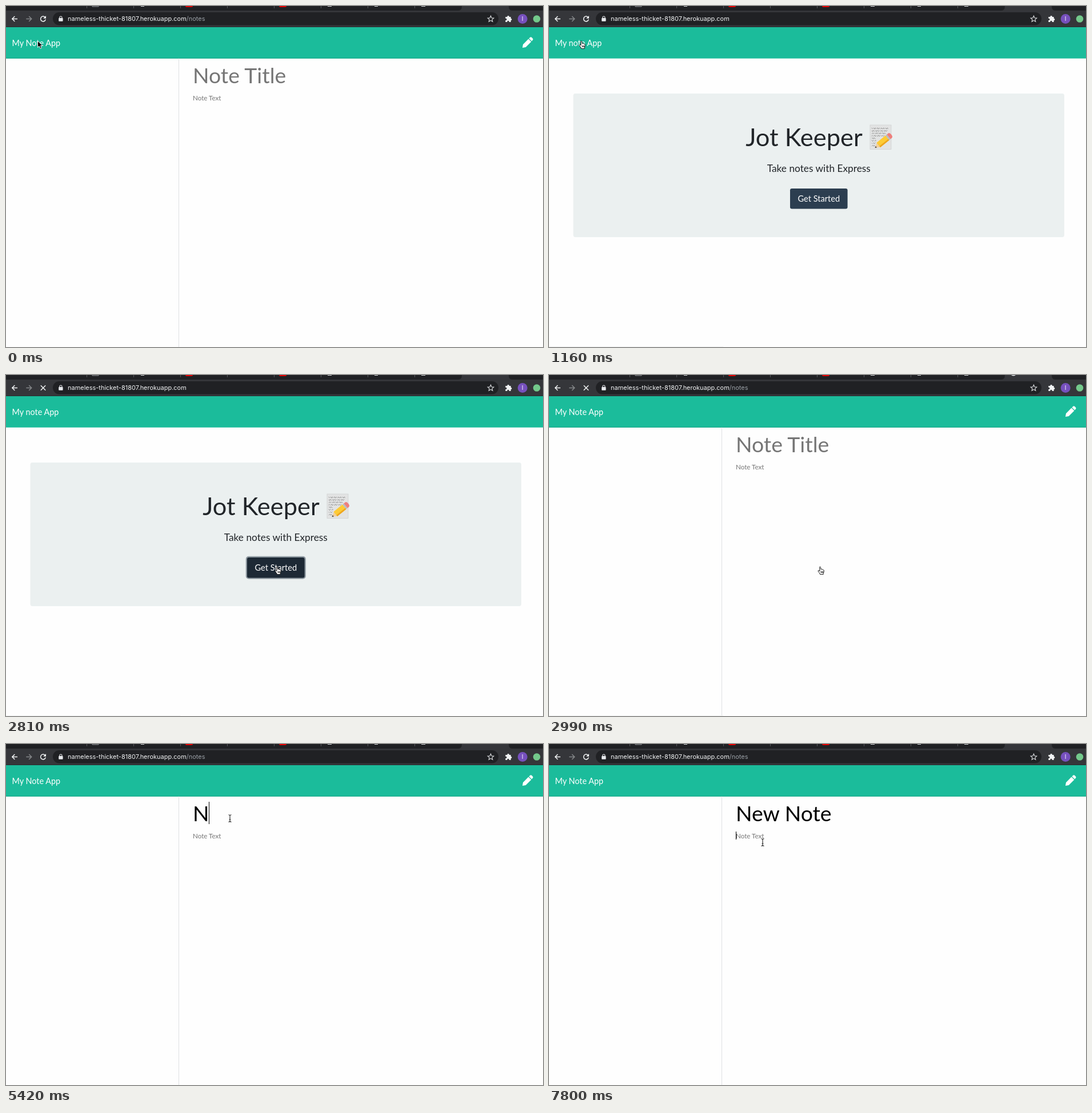
Animation, 940 px wide and 596 px high, one loop 8000 ms. Source, as an HTML page:

```html
<!DOCTYPE html>
<html lang="en">
<head>
<meta charset="utf-8">
<title>My Note App</title>
<style>
html, body { margin: 0; width: 100%; height: 100%; overflow: hidden; background: #fefefe; }
svg { display: block; }
text { font-family: Lato, sans-serif; white-space: pre; }
.ui { font-family: Inter, "Liberation Sans", sans-serif; font-size: 10.97px; }
.line { fill: none; stroke: #f1f3f4; stroke-width: 1.5; }
</style>
</head>
<body>
<svg width="940" height="596" viewBox="0 0 940 596">
  <defs>
    <path id="arrow" d="M0 0V11.5L2.7 9L4.6 13.3L6.7 12.4L4.9 8.3H8.4Z" fill="#000" stroke="#fff" stroke-width=".9"/>
    <path id="hand" d="M-2.5 -5.7C-2.5 -7.2 -.6 -7.2 -.5 -5.8L-.1 -2.4C.5 -3.2 1.8 -3 2 -2C2.8 -2.5 3.7 -2 3.9 -1.2C4.7 -1.4 5.3 -.8 5.3 0C5.3 2.4 4.8 3.6 4.2 4.6V6.4H-1.5C-2 4.6 -3.4 3 -4.8 1C-5.5 -.3 -4 -1 -3.1 0L-2 1ZM.2 1V4M2 1V4M3.7 1V4" fill="#fff" stroke="#000" stroke-width=".9" stroke-linejoin="round"/>
    <path id="beam" d="M-2.5 -6.2Q-.3 -6.2 0 -5Q.3 -6.2 2.5 -6.2M0 -5V5M-2.5 6.2Q-.3 6.2 0 5Q.3 6.2 2.5 6.2M-1.4 2H1.4" fill="none" stroke="#222" stroke-width="1.1"/>
  </defs>

  <rect width="940" height="596" fill="#fefefe"/>

  <!-- browser bar -->
  <rect width="940" height="37" fill="#35363a"/>
  <path d="M0 36.5H940" stroke="#2b2c2f"/>
  <path d="M0 0H798Q798 8 792 8H0ZM880 0H940V8H886Q880 8 880 0Z" fill="#202124"/>
  <path d="M141.5 0V4M223.5 0V4M305.5 0V4M387.5 0V4M469.5 0V4M551.5 0V4M633.5 0V4M715.5 0V4" stroke="#55575b"/>
  <path d="M151 0V1H162V0" fill="none" stroke="#9a9da1"/>
  <path d="M314 0H327V1Q326 2 324 2H317Q314 2 314 0ZM478 0H491V1Q490 2 488 2H481Q478 2 478 0Z" fill="#e80000"/>
  <path d="M236 0H242V1H236ZM645 0H651V1H645ZM563 0H570V1H563ZM727 0H734V1H727Z" fill="#d5d7d9"/>
  <path id="spinner" d="M809 0Q813 3 817 0Z" fill="#e8eaed"/>
  <rect x="82" y="11" width="780" height="22.5" rx="11.2" fill="#202124"/>
  <path class="line" d="M20 22.5H11M15.3 18L10.8 22.5L15.3 27"/>
  <path class="line" d="M35.3 22.5H44.3M40.2 18L44.7 22.5L40.2 27" style="stroke:#85878a"/>
  <g id="reload">
    <path class="line" d="M68.7 20.1A4.4 4.4 0 1 0 69.3 23.4"/>
    <path d="M70 17V21.8H65.2Z" fill="#f1f3f4"/>
  </g>
  <path id="stop" class="line" d="M60.8 18.3L69.2 26.7M69.2 18.3L60.8 26.7"/>
  <rect x="92.2" y="21" width="7.4" height="5.8" rx=".8" fill="#e8eaed"/>
  <path d="M93.9 21.5V20A2 2 0 0 1 97.9 20V21.5" fill="none" stroke="#e8eaed" stroke-width="1.1"/>
  <text class="ui" x="108" y="26.3" fill="#f1f3f4">nameless-thicket-81807.herokuapp.com<tspan id="path" fill="#9aa0a6">/notes</tspan></text>
  <path d="M848.5 17.2L850 20.8L853.8 21.1L850.9 23.6L851.8 27.3L848.5 25.3L845.2 27.3L846.1 23.6L843.2 21.1L847 20.8Z" fill="none" stroke="#dcdee0" stroke-width="1.1"/>
  <path d="M874.3 19H877.5A1.7 1.7 0 1 1 880.8 19H883.7V21.8A1.7 1.7 0 1 1 883.7 25.2V28H880.6A1.7 1.7 0 1 0 877.4 28H874.3V25A1.7 1.7 0 1 0 874.3 21.8Z" fill="#f1f3f4"/>
  <circle cx="904.2" cy="22.5" r="8.5" fill="#7650bd"/>
  <text class="ui" x="904.2" y="26" text-anchor="middle" fill="#fff" style="font-size:10px">I</text>
  <circle cx="929" cy="22.5" r="6.3" fill="#73c98b"/>

  <!-- page header -->
  <rect y="37" width="940" height="54.7" fill="#1bbc9b"/>
  <text id="brand" x="10.6" y="69.8" font-size="14.4" fill="#fff"></text>

  <g id="notes">
    <path d="M0 91.2H940" stroke="#17a589"/>
    <path d="M302.5 91.7V596" stroke="#dfe1e3"/>
    <path d="M904 73L905 67.2L914.6 57.6L919.4 62.4L909.8 72ZM915.5 56.7L917.4 54.8Q918.7 53.6 920 54.8L922 56.8Q923.2 58.2 922 59.5L920.2 61.4Z" fill="#fff"/>
    <text id="title" x="327" y="134.8" font-size="37.4"></text>
    <text x="327" y="164.6" font-size="11.6" fill="#757575">Note Text</text>
    <rect id="caret" width="1" fill="#000"/>
  </g>

  <g id="home">
    <rect x="42.5" y="153" width="859.5" height="251" rx="3.7" fill="#ebf0f0"/>
    <text x="446.5" y="245" font-size="43.4" text-anchor="middle" fill="#212529">Jot Keeper</text>
    <rect x="562" y="208" width="37" height="42.5" fill="#e2e3e3" stroke="#d0d2d2" stroke-width=".8"/>
    <path id="scribble" fill="none" stroke="#777" stroke-width=".7"/>
    <g transform="translate(570.5 248) rotate(-39)">
      <path d="M0 0L9 -5.2V5.2Z" fill="#f0cf9e"/>
      <path d="M0 0L3 -1.7V1.7Z" fill="#444"/>
      <rect x="8" y="-5.2" width="20" height="10.4" fill="#fdcb35"/>
      <rect x="8" y="2.6" width="20" height="2.6" fill="#eda51f"/>
      <rect x="28" y="-5.2" width="3" height="10.4" fill="#b9bcc0"/>
      <path d="M31 -5.2H33.5Q37 -5.2 37 0T33.5 5.2H31Z" fill="#ee7f7c"/>
    </g>
    <text x="472.3" y="290" font-size="17.3" text-anchor="middle" fill="#212529">Take notes with Express</text>
    <rect id="ring" x="419.8" y="316.8" width="105" height="39.6" rx="5" fill="#8c979f"/>
    <rect id="button" x="422" y="319" width="100.6" height="35.5" rx="3.2"/>
    <text x="472.3" y="342" font-size="14.6" text-anchor="middle" fill="#fff">Get Started</text>
  </g>

  <rect id="status" y="595" width="305" height="1" fill="#f2f3f3"/>
  <use id="cursor"/>
</svg>
<script>
const LOOP = 8000;
const $ = id => document.getElementById(id);
const show = (id, on) => $(id).style.display = on ? "" : "none";
const set = (id, attrs) => Object.entries(attrs).forEach(([k, v]) => $(id).setAttribute(k, v));
const during = (t, a, b) => t >= a && t < b;

// time, shape, x, y
const moves = [
  [0, "arrow", 55.5, 61], [290, "hand", 58, 68],
  [1310, "arrow", 190, 170], [1490, "arrow", 418.5, 346],
  [1790, "hand", 448, 349], [1940, "hand", 463, 345], [2090, "hand", 472, 343], [2230, "hand", 476, 342],
  [3140, "arrow", 474, 335], [3300, "arrow", 410, 270], [3460, "arrow", 290, 185], [3620, "arrow", 185, 131],
  [3770, "arrow", 225, 128], [3920, "arrow", 290, 126], [4070, "beam", 350, 128], [4220, "beam", 386, 130],
  [4370, "beam", 392, 130],
  [7210, "beam", 390, 142], [7360, "beam", 384, 162], [7500, "beam", 376, 177], [7650, "beam", 374, 172]
];
const typed = "New Note";
const keys = [5420, 5570, 5710, 5860, 6160, 6310, 6460, 6610];

// handwriting: wavy lines that get shorter beside the pencil
let scribble = "";
for (let row = 0; row < 8; row++) {
  const end = row < 4 ? 595 - row * 2 : 578 - row;
  for (let x = 565; x < end; x += 1.3) {
    const y = 214 + row * 4.3 + Math.sin(x * 3 + row * 5) * 1.2;
    const gap = Math.sin(x * 0.9 + row * 2) > 0.85;
    scribble += `${x === 565 || gap ? "M" : "L"}${x.toFixed(1)} ${y.toFixed(1)}`;
  }
}
set("scribble", { d: scribble });

function draw(t) {
  const home = during(t, 1160, 2990);
  const loading = during(t, 620, 1160) || during(t, 2810, 3300);
  show("home", home);
  show("notes", !home);
  show("reload", !loading);
  show("stop", loading);
  show("spinner", during(t, 2990, 3300));
  show("path", t < 620 || t >= 2990);
  show("status", during(t, 920, 1310) || during(t, 2670, 3300));
  $("brand").textContent = home ? "My note App" : "My Note App";

  show("ring", t >= 2670);
  set("button", { fill: t < 1790 ? "#2c3e50" : t < 1940 ? "#253544" : "#1d2935" });

  const count = keys.filter(k => k <= t).length;
  $("title").textContent = count ? typed.slice(0, count) : "Note Title";
  set("title", { fill: count ? "#000" : "#757575" });

  const inText = t >= 7800;
  show("caret", during(t, 4370, 4820) || during(t, 5420, 7060) || inText);
  if (!home) {
    const x = 327 + (count && !inText ? $("title").getComputedTextLength() : 0);
    set("caret", { x: Math.floor(x), y: inText ? 153 : 101, height: inText ? 14 : 39 });
  }

  const [, shape, x, y] = moves.filter(m => m[0] <= t).pop();
  set("cursor", { href: "#" + shape, x, y });
}

const start = performance.now();
function tick() {
  draw((performance.now() - start) % LOOP);
  requestAnimationFrame(tick);
}
tick();
</script>
</body>
</html>
```
